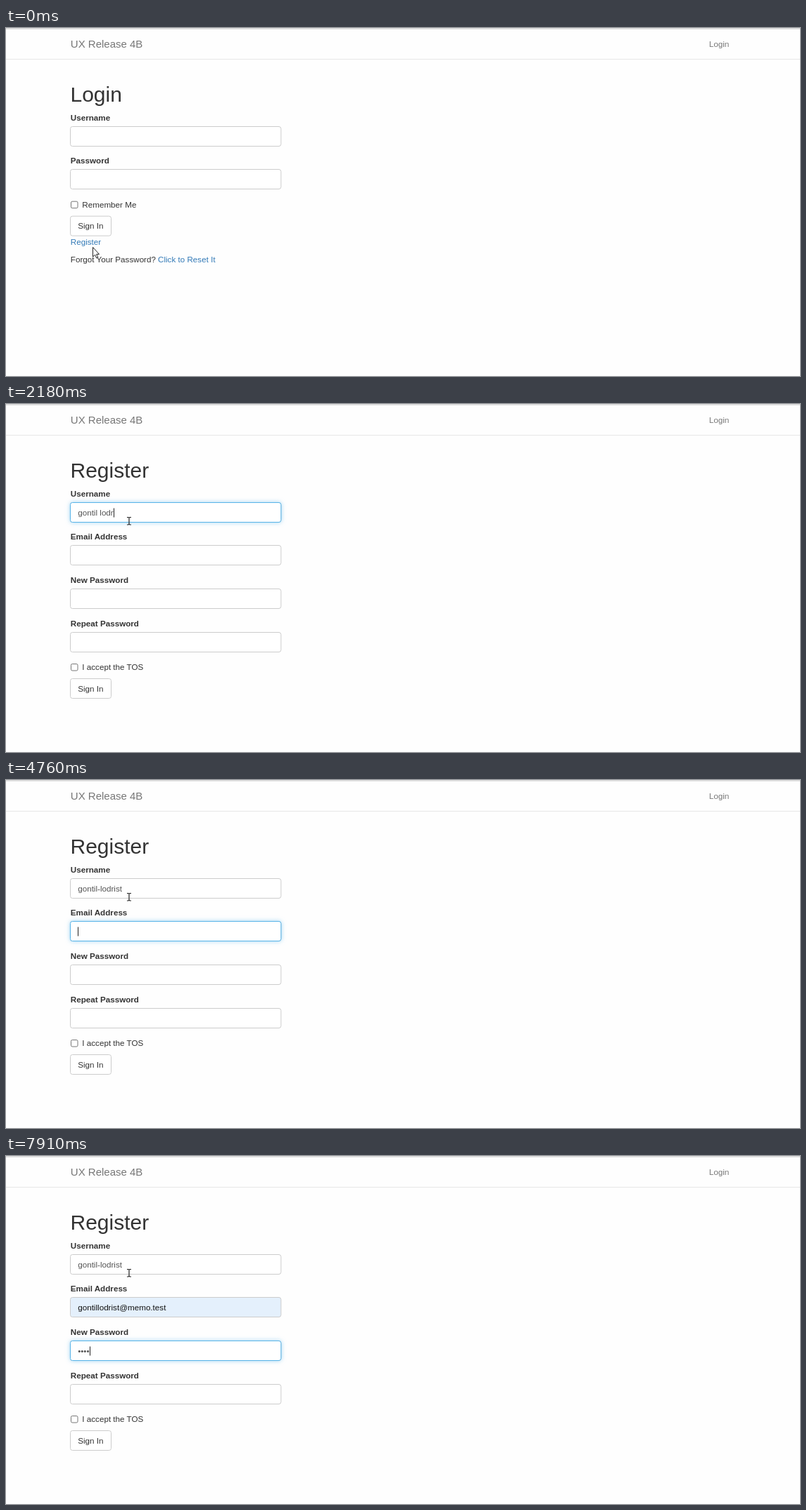
Recreate the animation shown at these times as an HTML page. Size 1129 by 496 pixels, loop 8 s.

```html
<!DOCTYPE html>
<html lang="en">
<head>
<meta charset="utf-8">
<title>Register form</title>
<style>
  html, body { margin: 0; width: 100%; height: 100%; overflow: hidden; background: #fefefe; }
  svg { display: block; width: 1129px; height: 496px; }
  text { font: 11.67px "Liberation Sans", Arial, sans-serif; fill: #333; white-space: pre; }
  .nav { fill: #777; }
  .brand { font-size: 15px; }
  .title { font-size: 30px; }
  .label { font-weight: 700; }
  .link { fill: #337ab7; }
  .hover { fill: #23527c; text-decoration: underline; }
  .value { fill: #555; }
  .filled { fill: #111; }
  .selected { fill: #fff; }
  .item, .manage, .preview { font-family: "Open Sans", "Noto Sans", sans-serif; font-size: 10.3px; fill: #222; }
  .item { font-weight: 600; }
  .preview { font-size: 10.5px; fill: #111; }
  .box { fill: #fff; stroke: #ccc; }
  .glow { stroke: #58b4e8; filter: drop-shadow(0 0 3px rgba(102, 185, 235, .6)); }
  .check { fill: #fff; stroke: #767676; }
  .panel { fill: #fff; stroke: #e4e4e4; stroke-width: .8; filter: drop-shadow(0 1px 1.2px rgba(0, 0, 0, .28)); }
</style>
</head>
<body>
<svg id="stage" viewBox="0 0 1129 496"></svg>
<script>
const stage = document.getElementById('stage');
const pen = document.createElement('canvas').getContext('2d');
pen.font = '11.67px "Liberation Sans", Arial, sans-serif';

const LOOP = 8000;
const LEFT = 91.5, WIDTH = 299.5, TEXT_X = 102.2;
const USER = 'gontil lodrist', JOINED = 'gontillodrist', DASHED = 'gontil-lodrist';
const EMAIL = JOINED + '@memo.test', SCHOOL = 'glodrist@lumno.test';
const ALL_USERS = ['glodrist', SCHOOL, 'Gontil', EMAIL, 'gontil', 'glassfritter'];

// Each step overrides part of the state that came before it.
const steps = [
  [0, { page: 'login', cursor: ['arrow', 123, 312], hover: false, values: ['', '', '', ''],
        focus: [0, 0, 0, 0], caret: null, list: null, selected: false, autofill: '' }],
  [140, { cursor: ['hand', 122, 303], hover: true }],
  [270, { cursor: ['hand', 119, 301] }],
  [550, { page: 'register', cursor: ['beam', 180, 225] }],
  [690, { cursor: ['beam', 177, 198] }],
  [810, { cursor: ['beam', 175, 161] }],
  [950, { focus: [.5, 0, 0, 0] }],
  [1080, { focus: [1, 0, 0, 0], caret: [0, 0] }],
  [1200, { ...user('g'), list: { field: 0, items: ALL_USERS, faint: true } }],
  [1330, { list: { field: 0, items: ALL_USERS } }],
  [1470, { ...user('gon'), list: { field: 0, items: ['Gontil', EMAIL, 'gontil', '', '', ''] } }],
  [1630, user('gont')],
  [1770, { ...user('gontil'), list: { field: 0, items: ['gontil'], faint: true } }],
  [1890, { ...user('gontil '), list: null }],
  [2050, user('gontil lo')],
  [2180, user('gontil lodr')],
  [2330, user('gontil lodris')],
  [2450, user(USER)],
  [2580, { focus: [.4, .6, 0, 0], caret: [1, 0] }],
  [2710, { focus: [0, 1, 0, 0] }],
  [2980, { caret: null }],
  [3540, { focus: [.6, .4, 0, 0], selected: true }],
  [3670, { focus: [1, 0, 0, 0] }],
  [3790, { selected: false, caret: [0, 14] }],
  [3920, { caret: [0, 7] }],
  [4040, { ...user(JOINED, 6), list: { field: 0, items: [USER], faint: true } }],
  [4170, { list: null }],
  [4320, user(DASHED, 7)],
  [4630, { focus: [.4, .6, 0, 0], caret: [1, 0] }],
  [4760, { focus: [0, 1, 0, 0] }],
  [5200, { caret: null }],
  [5660, { ...email('g'), list: { field: 1, items: [EMAIL, SCHOOL], manage: true } }],
  [5800, { ...email('go'), list: { field: 1, items: [EMAIL], manage: true } }],
  [5940, email('gont')],
  [6230, email('gontil')],
  [6360, email('gontill')],
  [6770, { ...email(EMAIL), caret: null, autofill: 'preview',
           list: { field: 1, items: [EMAIL], manage: true, active: true } }],
  [6930, { autofill: 'filled', focus: [0, 0, 1, 0], caret: [2, 0],
           list: { field: 1, items: [EMAIL], manage: true, faint: true } }],
  [7080, { list: null }],
  [7360, { caret: null }],
  [7640, password(2)],
  [7770, password(3)],
  [7910, password(4)]
];

function user(value, at = value.length) {
  return { values: [value, '', '', ''], caret: [0, at] };
}
function email(value) {
  return { values: [DASHED, value, '', ''], caret: [1, value.length] };
}
function password(count) {
  return { values: [DASHED, EMAIL, '•'.repeat(count), ''], caret: [2, count] };
}

const text = (x, y, value, style = '') => `<text x="${x}" y="${y}" class="${style}">${value}</text>`;
const rect = (x, y, w, h, attrs = '') => `<rect x="${x}" y="${y}" width="${w}" height="${h}" ${attrs}/>`;
const rowTop = row => Math.floor(140 + 61.67 * row) + .5;
const textWidth = value => pen.measureText(value).width;

function field(row, label, s) {
  const top = rowTop(row), value = s.values[row];
  const autofill = row === 1 ? s.autofill : '';
  const tint = autofill ? 'style="fill:#e4f0fc"' : '';
  let out = text(91.8, top - 8.5, label, 'label') +
    rect(LEFT, top, WIDTH, 28, `rx="3" class="box" ${tint}`);
  if (s.focus[row]) out += rect(LEFT, top, WIDTH, 28, `rx="3" class="box glow" opacity="${s.focus[row]}" ${tint}`);
  const marked = row === 0 && s.selected;
  if (marked) out += rect(TEXT_X, top + 8, textWidth(value), 13.5, 'fill="#3390ff"');
  out += text(TEXT_X, top + 18.2, value, marked ? 'selected' : autofill || 'value');
  if (s.caret && s.caret[0] === row) {
    const x = Math.round(TEXT_X + textWidth(value.slice(0, s.caret[1])));
    out += rect(x, top + 8, 1, 13, 'fill="#222"');
  }
  return out;
}

function footer(y, label) {
  return rect(92.5, y - 8.5, 9.5, 9.5, 'rx="1.8" class="check"') + text(108.3, y, label) +
    rect(LEFT, y + 12.5, 58, 28, 'rx="3" class="box"') + text(102.2, y + 30.7, 'Sign In');
}

function dropdown({ field, items, manage, active, faint }) {
  const top = rowTop(field) + 29, end = top + 7 + 30 * items.length;
  const bottom = end + (manage ? 33.5 : 7);
  const mid = LEFT + WIDTH / 2;
  let out = rect(LEFT + .3, top, WIDTH - .1, bottom - top, 'rx="2" class="panel"');
  if (active) out += rect(92, top + 7, 299, 30, 'fill="#e7e7e7"');
  items.forEach((item, i) => out += text(101.6, top + 25.7 + 30 * i, item, 'item'));
  if (manage) {
    if (!active) out += rect(92, end - .5, 299, 1, 'fill="#dcdcdc"');
    out += text(101.6, end + 21, 'Manage...', 'manage');
  }
  const fade = faint ? `opacity=".22" transform="translate(${mid} ${top}) scale(.967) translate(${-mid} ${-top})"` : '';
  return `<g ${fade}>${out}</g>`;
}

const cursors = {
  arrow: '<path d="M.5 .5V14L3.6 11.2 5.8 16 7.8 15.1 5.7 10.4H9.5Z" fill="#fff" stroke="#222"/>',
  hand: '<path d="M4 9V2Q4 .6 5.2 .6T6.4 2V6Q8.4 5.2 9 6.5 10.8 6 11.2 7.2 13 6.8 13.2 8.4V11.5L11.8 16H5.5L1 10.4Q.8 8.7 2.3 8.6Z" fill="#fff" stroke="#222"/>',
  beam: '<path d="M-3 .5H-1L0 1.2 1 .5H3M0 1V10.5M-3 11H-1L0 10.3 1 11H3" fill="none" stroke="#222" stroke-width="1.2"/>'
};

function draw(s) {
  const login = s.page === 'login';
  const labels = login ? ['Username', 'Password']
    : ['Username', 'Email Address', 'New Password', 'Repeat Password'];
  let out = rect(0, 0, 1129, 2, 'fill="#dedede"') + rect(0, 44, 1129, 1, 'fill="#e7e7e7"') +
    text(91.8, 28.3, 'UX Release 4B', 'nav brand') + text(999.7, 27.3, 'Login', 'nav') +
    text(91.5, 105, login ? 'Login' : 'Register', 'title') +
    labels.map((label, row) => field(row, label, s)).join('');
  if (login) {
    out += footer(255.7, 'Remember Me') +
      text(91.8, 308.7, 'Register', s.hover ? 'hover' : 'link') +
      text(91.8, 333.5, 'Forgot Your Password?') + text(216, 333.5, 'Click to Reset It', 'link');
  } else {
    out += footer(379, 'I accept the TOS');
  }
  if (s.list) out += dropdown(s.list);
  const [shape, x, y] = s.cursor;
  stage.innerHTML = out + `<g transform="translate(${x} ${y})">${cursors[shape]}</g>`;
}

let state = {};
const states = steps.map(([time, change]) => ({ time, look: state = { ...state, ...change } }));
let shown = null;

function tick(now) {
  const time = now % LOOP;
  const current = states.findLast(step => step.time <= time);
  if (current !== shown) draw((shown = current).look);
  requestAnimationFrame(tick);
}
tick(performance.now());
</script>
</body>
</html>
```
